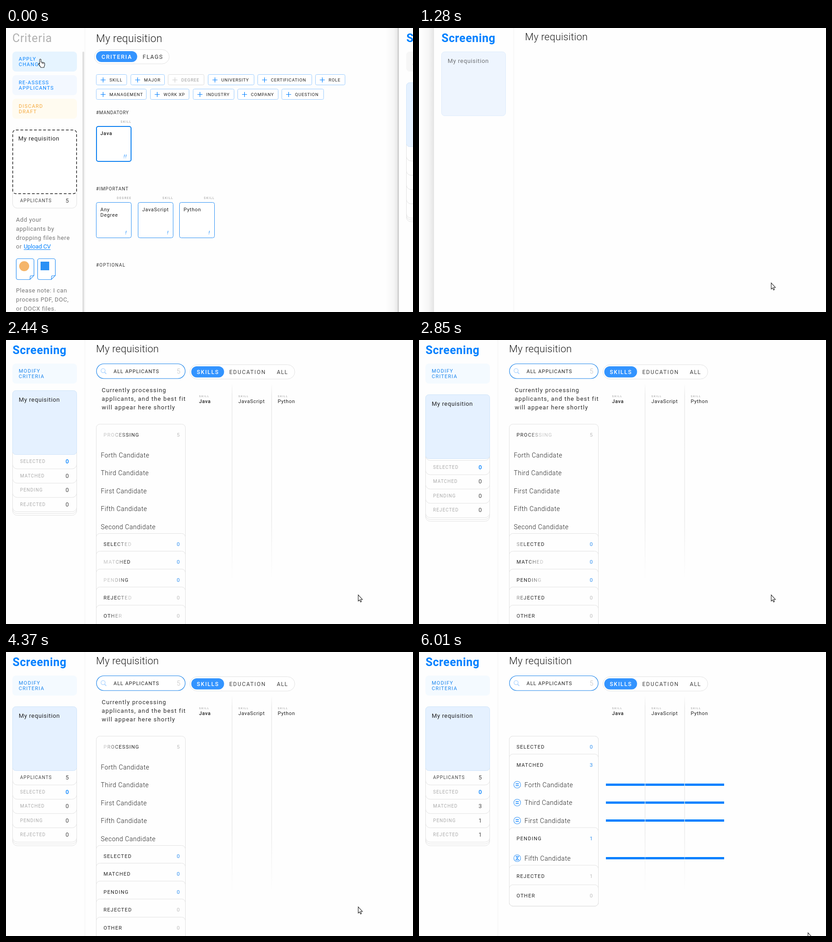
Recreate the animation shown at these times as an HTML page with a canvas. Size 895x626 px, loop 6080 ms.

```html
<!DOCTYPE html>
<html lang="en">
<head>
<meta charset="utf-8">
<title>Requisition screening</title>
<style>
html, body { margin: 0; width: 100%; height: 100%; overflow: hidden; background: #fefefe; }
canvas { display: block; width: 100vw; height: 100vh; }
</style>
</head>
<body>
<canvas id="stage" width="895" height="626"></canvas>
<script>
const ctx = document.getElementById('stage').getContext('2d');
const W = 895, H = 626, LOOP = 6080;
const BLUE = '#0080ff', PAPER = '#fefefe', LINE = '#e2e2e2', INK = '#222', GREY = '#aaa';

const clamp = v => Math.max(0, Math.min(1, v));
const ramp = (t, a, b) => clamp((t - a) / (b - a));
const ease = (u, p = 2) => u < 0.5 ? (2 * u) ** p / 2 : 1 - (2 - 2 * u) ** p / 2;
const mix = (a, b, u) => a + (b - a) * u;

// Piecewise linear track: time, value, time, value, ...
function track(t, ...k) {
  if (t <= k[0]) return k[1];
  for (let i = 2; i < k.length; i += 2)
    if (t < k[i]) return mix(k[i - 1], k[i + 1], ramp(t, k[i - 2], k[i]));
  return k[k.length - 1];
}

function text(s, x, y, size, color, gap = 0, weight = 400, align = 'left') {
  ctx.font = `${weight} ${size}px Roboto, "Open Sans", sans-serif`;
  ctx.letterSpacing = gap + 'px';
  ctx.textAlign = align;
  ctx.fillStyle = color;
  ctx.fillText(s, x, y);
}

function box(x, y, w, h, r, fill, stroke, lw = 1) {
  ctx.beginPath();
  ctx.roundRect(x, y, w, h, r);
  if (fill) { ctx.fillStyle = fill; ctx.fill(); }
  if (stroke) { ctx.strokeStyle = stroke; ctx.lineWidth = lw; ctx.stroke(); }
}

function lines(color, lw, ...segs) {
  ctx.beginPath();
  for (const [x, y, ...rest] of segs) {
    ctx.moveTo(x, y);
    for (let i = 0; i < rest.length; i += 2) ctx.lineTo(rest[i], rest[i + 1]);
  }
  ctx.strokeStyle = color;
  ctx.lineWidth = lw;
  ctx.stroke();
}

function faded(alpha, draw) {
  if (alpha <= 0) return;
  ctx.save();
  ctx.globalAlpha *= alpha;
  draw();
  ctx.restore();
}

function divider() {
  ctx.fillStyle = '#d8d8d8';
  for (let y = 0; y < H; y += 3) ctx.fillRect(173, y, 1, 1);
}

function sideButton(y, a, b, fill, color) {
  box(14, y, 142, 44, 8, fill);
  text(a, 28, y + 20, 11, color, 1.25);
  text(b, 28, y + 32, 11, color, 1.25);
}

/* ---------- criteria page ---------- */

function chip(x, right, y, label, off) {
  const color = off ? '#ccc' : BLUE;
  box(x + 0.5, y + 0.5, right - x - 1, 23, 3, '#fff', off ? '#dcdcdc' : '#99cbff');
  const cx = x + 15.5, cy = y + 12.5;
  lines(color, 1.2, [cx - 5.5, cy, cx + 5.5, cy], [cx, cy - 5.5, cx, cy + 5.5]);
  text(label, x + 29.5, y + 15.5, 9.5, off ? '#999' : INK, 0.85);
}

function skillCard(x, y, kind, words, mark, strong) {
  const lw = strong ? 2 : 1, inset = lw / 2;
  text(kind, x + 78, y - 7, 6.5, GREY, 1.4, 500, 'right');
  box(x + inset, y + inset, 78 - lw, 79 - lw, 4, '#fff', strong ? '#0a7ef0' : '#2a90f5', lw);
  words.forEach((w, i) => text(w, x + 9.5, y + 19.5 + i * 12.5, 11, INK, 0.7, strong ? 500 : 400));
  text(mark, x + 68, y + 71, 11, BLUE, 1, 'italic 400', 'right');
}

// Sheet with the lower right corner folded over.
function docIcon(x) {
  const l = x + 0.5, r = x + 39.5, top = 508.5, b = 554.5;
  ctx.beginPath();
  ctx.moveTo(r - 9, b);
  ctx.arcTo(l, b, l, top, 4);
  ctx.arcTo(l, top, r, top, 4);
  ctx.arcTo(r, top, r, b, 4);
  ctx.lineTo(r, b - 9);
  ctx.closePath();
  ctx.fillStyle = '#fff';
  ctx.fill();
  ctx.strokeStyle = '#2a90f5';
  ctx.lineWidth = 1.2;
  ctx.stroke();
  lines('#2a90f5', 1.2, [r - 9, b, r - 8, b - 8, r, b - 9]);
}

function criteriaPage() {
  text('Criteria', 14, 30.5, 25, '#b0b0b0', 0.9);
  box(168, 52, 4, H, 2, '#e0e0e0');
  divider();
  sideButton(52, 'APPLY', 'CHANGES', '#e6f4ff', BLUE);
  sideButton(104, 'RE-ASSESS', 'APPLICANTS', '#f3f8ff', BLUE);
  sideButton(156, 'DISCARD', 'DRAFT', '#fffbf0', '#f5a93c');

  box(14.5, 330, 141, 67, 10, PAPER, LINE);
  ctx.setLineDash([6, 4]);
  box(14.75, 224.75, 140.5, 140.5, 7, '#fff', '#222', 1.5);
  ctx.setLineDash([]);
  text('My requisition', 27, 248, 13, INK, 0.65);
  text('APPLICANTS', 31, 384, 10, '#444', 1.07);
  text('5', 131, 385, 12.5, '#444');

  const note = (s, y) => text(s, 22, y, 13, '#777', 0.58);
  note('Add your', 427);
  note('applicants by', 447);
  note('dropping files here', 467);
  note('or', 486);
  text('Upload CV', 39, 486, 13, BLUE, -0.15);
  lines(BLUE, 1, [39, 488.5, 98, 488.5]);
  docIcon(22);
  docIcon(69);
  box(29, 514, 22, 22, 11, '#f5b56a');
  box(76, 515, 19, 19, 0, '#2a90f5');
  note('Please note: I can', 583);
  note('process PDF, DOC,', 603);
  note('or DOCX files.', 623);

  text('My requisition', 198, 31, 23, INK, 0.3, 300);
  box(194.5, 47.5, 164.5, 31.5, 16, '#fff', LINE);
  box(198, 51, 90.5, 24, 12, '#3394ff');
  text('CRITERIA', 210, 67.5, 12.5, '#fff', 1.75, 500);
  text('FLAGS', 300.5, 67.5, 12.5, '#333', 1.5);

  chip(198, 266, 102, 'SKILL');
  chip(274, 349, 102, 'MAJOR');
  chip(356, 436, 102, 'DEGREE', true);
  chip(444, 546, 102, 'UNIVERSITY');
  chip(553, 673, 102, 'CERTIFICATION');
  chip(680, 746, 102, 'ROLE');
  chip(198, 309, 134, 'MANAGEMENT');
  chip(317, 403, 134, 'WORK XP');
  chip(411, 502, 134, 'INDUSTRY');
  chip(509, 599, 134, 'COMPANY');
  chip(606, 699, 134, 'QUESTION');

  text('#MANDATORY', 198, 190, 10, '#333', 0.65);
  text('#IMPORTANT', 198, 358, 10, '#333', 1);
  text('#OPTIONAL', 198, 526, 10, '#333', 1.2);
  skillCard(198, 216, 'SKILL', ['Java'], '!!', true);
  skillCard(198, 384, 'DEGREE', ['Any', 'Degree'], '!');
  skillCard(290, 384, 'SKILL', ['JavaScript'], '!');
  skillCard(381, 384, 'SKILL', ['Python'], '!');
}

/* ---------- screening page ---------- */

// Stack of counters under the requisition card; `grow` opens the first row.
function sideStack(y, grow, cardAlpha, rowAlpha, counts) {
  const base = y + 142, step = 31.5;
  faded(rowAlpha, () => {
    const rows = ['APPLICANTS', 'SELECTED', 'MATCHED', 'PENDING', 'REJECTED'];
    const bottom = i => base - 0.5 + step * (i + grow);
    const panel = b => box(14.5, base - 24, 141, b - base + 24, 10, PAPER, LINE);
    panel(bottom(4) + 8);
    panel(bottom(4) + 4);
    for (let i = 4; i >= 0; i--) {
      if (!i && !grow) break;
      const b = bottom(i);
      panel(b);
      faded(i ? 1 : grow, () => {
        text(rows[i], 31, b - 13, 10, i ? GREY : '#444', 1.1);
        text(counts[i], 131, b - 12, 12.5, i === 1 ? BLUE : '#444', 0, i === 1 ? 500 : 400);
      });
    }
  });
  faded(cardAlpha, () => {
    box(14.5, y + 0.5, 141, 141, 7, '#e5f1ff', '#cfe4fa');
    text('My requisition', 28, y + 25, 13, INK, 0.65);
  });
}

function sidebar(t) {
  text('Screening', 14.5, 30.5, 25, BLUE, 0.6, 700);
  divider();
  const start = t < 740;
  const y = start ? 120 : track(t, 1830, 52, 2010, 76, 2440, 111, 2650, 115, 2800, 120);
  const grow = start ? 1 : ease(ramp(t, 2700, 3300));
  const done = t > 4720;
  faded(start ? 1 : ramp(t, 1840, 2040), () =>
    sideButton(52, 'MODIFY', 'CRITERIA', start ? '#f6f6f6' : '#f4faff', start ? GREY : '#1a85ee'));
  sideStack(y, grow, start ? 1 : ramp(t, 1050, 1420), start ? 1 : ramp(t, 1400, 1700),
    done ? [5, 0, 3, 1, 1] : [5, 0, 0, 0, 0]);
}

// Ink with a pale band that travels to the right.
function shimmer(t, shift, until) {
  if (t > until) return INK;
  const c = 160 + ((60 + shift + (t - 2440) * 160 / 1020) % 160 + 160) % 160;
  const g = ctx.createLinearGradient(c - 45, 0, c + 45, 0);
  g.addColorStop(0, INK);
  g.addColorStop(0.3, '#c4c4c4');
  g.addColorStop(0.7, '#c4c4c4');
  g.addColorStop(1, INK);
  return g;
}

function groupPanel(label, top, bottom, ink, count, countColor) {
  box(198.5, top, 196, bottom - top, 8, PAPER, LINE);
  text(label, 214.5, top + 27.5, 11, ink, 1.28);
  text(count, 375.5, top + 27.5, 11.5, countColor);
}

const nameText = (s, x, y) => text(s + ' Candidate', x, y + 5, 14, INK, 0.55, 300);

function statusIcon(y, waiting) {
  box(208.5, y - 7.5, 15, 15, 7.5, '#fff', '#3a97f5', 1.1);
  if (waiting)
    lines(BLUE, 1.1, [213, y - 4, 219, y - 4, 213, y + 4, 219, y + 4, 213, y - 4]);
  else
    lines(BLUE, 1.3, [212.5, y - 2, 219.5, y - 2], [212.5, y + 2, 219.5, y + 2]);
}

function groups(t) {
  const u = ease(ramp(t, 4540, 4980));
  const lift = track(t, 5290, -40, 5410, 0);
  const bottom = mix(650, 560 + lift, u);
  const done = t > 4720;

  groupPanel('PROCESSING', 185.5, bottom, shimmer(t, 0, 4540), 5, '#bbb');
  ['Forth', 'Third', 'First', 'Fifth', 'Second'].forEach((n, i) => nameText(n, 208.5, 253.5 + 39.5 * i));

  const list = [
    ['SELECTED', 426.5, 185.5, 67, 0, '#2a8df0'],
    ['MATCHED', 465.5, 225, 0, 3, '#2a8df0', 'Forth', 'Third', 'First'],
    ['PENDING', 505, 387 + lift, 0, 1, '#2a8df0', 'Fifth'],
    ['REJECTED', 544.5, 470 + lift, 67, 1, '#bbb'],
    ['OTHER', 584.5, 513 + lift, 50, 0, '#bbb']
  ];
  const bars = [];
  for (const [label, from, to, shift, count, color, ...names] of list) {
    const top = mix(from, to, u);
    groupPanel(label, top, bottom, shimmer(t, shift, 3310), done ? count : 0, color);
    if (u > 0) names.forEach((n, i) => {
      const y = top + 67.5 + 39.5 * i;
      statusIcon(y, label === 'PENDING');
      nameText(n, 232, y);
      bars.push([y, n === 'First' ? 5190 : 4800]);
    });
  }
  for (const [y, at] of bars) if (t >= at) {
    ctx.fillStyle = BLUE;
    ctx.fillRect(411, y - 2.5, 260, 5);
  }
}

function columns() {
  const g = ctx.createLinearGradient(0, 96, 0, 530);
  g.addColorStop(0, 'rgba(225,225,225,0)');
  g.addColorStop(0.06, '#e6e6e6');
  g.addColorStop(0.7, '#e8e8e8');
  g.addColorStop(1, 'rgba(232,232,232,0)');
  ctx.fillStyle = g;
  ctx.fillRect(496.5, 96, 1.3, 434);
  ctx.fillRect(583.5, 96, 1.3, 434);
  ['Java', 'JavaScript', 'Python'].forEach((s, i) => {
    const x = 424.5 + i * 86.5;
    text('SKILL', x, 126, 6.2, GREY, 1.4, 500);
    text(s, x, 138.5, 11, INK, 0.65, i ? 400 : 500);
  });
}

function results(t) {
  box(199, 52.5, 195, 32.5, 16.2, '#fff', '#1f86ea', 1.2);
  box(209, 63, 9, 9, 4.5, null, '#b5d9ff', 1.5);
  lines('#b5d9ff', 2, [216.8, 71, 220.5, 74.8]);
  text('ALL APPLICANTS', 236.5, 73, 11, INK, 0.98);
  text('5', 375.5, 74, 14, '#bbb', 0, 300);

  box(404.5, 54.5, 230.5, 31.5, 16, '#fff', LINE);
  box(407.5, 58, 72, 24.5, 12, '#3394ff');
  text('SKILLS', 419.5, 75, 12, '#fff', 1.8, 500);
  text('EDUCATION', 491, 75, 12, '#444', 1.8);
  text('ALL', 595.5, 75, 12, '#444', 1.4);

  faded(1 - ramp(t, 4540, 4760), () =>
    ['Currently processing', 'applicants, and the best fit', 'will appear here shortly']
      .forEach((s, i) => text(s, 210.5, 115 + 19 * i, 13, '#2c2c2c', 1.17)));
  groups(t);
  columns();
}

function screeningPage(t) {
  const x = Math.round(mix(866, 0, ease(ramp(t, 700, 1400), 2.35)));
  ctx.save();
  ctx.translate(x, 0);
  if (x > 0) {
    const g = ctx.createLinearGradient(-32, 0, -2, 0);
    g.addColorStop(0, 'rgba(0,0,0,0)');
    g.addColorStop(0.6, 'rgba(0,0,0,0.03)');
    g.addColorStop(1, 'rgba(0,0,0,0.1)');
    ctx.fillStyle = g;
    ctx.fillRect(-32, 0, 30, H);
    ctx.fillStyle = PAPER;
    ctx.fillRect(-2, 0, W + 2, H);
    if (t < 740) {
      ctx.fillStyle = '#cfcfcf';
      ctx.fillRect(-5, 0, 3, H);
    }
  }
  sidebar(t);
  text('My requisition', 198, 27, 22, INK, 0.2, 300);
  faded(ramp(t, 1370, 1700), () => results(t));
  ctx.restore();
}

/* ---------- pointer ---------- */

const ARROW = new Path2D('M0 0V13.5L3 10.8L5 15.5L7.2 14.6L5.2 10H9.3Z');
const HAND = new Path2D('M2 1.5Q3.5-.5 5 1.5V7L10.5 8Q13 8.5 13 11V14Q12 16 11.5 19H4.5Q3 15.5-.5 12Q-1.5 9.5 2 11.5Z');

function pointer(t) {
  const a = ease(ramp(t, 100, 640)), b = ease(ramp(t, 5640, 6020));
  const x = mix(mix(72, 774.5, a), 855.5, b);
  const y = mix(mix(68, 574, a) - 12 * ramp(t, 640, 760), 619, b);
  const shape = x < 150 && y < 96 ? HAND : ARROW;
  ctx.save();
  ctx.translate(x, y);
  ctx.fillStyle = '#fff';
  ctx.strokeStyle = '#222';
  ctx.lineWidth = 1.1;
  ctx.fill(shape);
  ctx.stroke(shape);
  if (shape === HAND) lines('#222', 1, [7.5, 8, 7.5, 11], [10, 8.5, 10, 11.5]);
  ctx.restore();
}

function draw(now) {
  const t = now % LOOP;
  ctx.fillStyle = PAPER;
  ctx.fillRect(0, 0, W, H);
  faded(1 - ramp(t, 720, 960), criteriaPage);
  screeningPage(t);
  pointer(t);
}

let begin;
function tick(now) {
  begin ??= now;
  draw(now - begin);
  requestAnimationFrame(tick);
}
draw(0);
requestAnimationFrame(tick);
</script>
</body>
</html>
```
